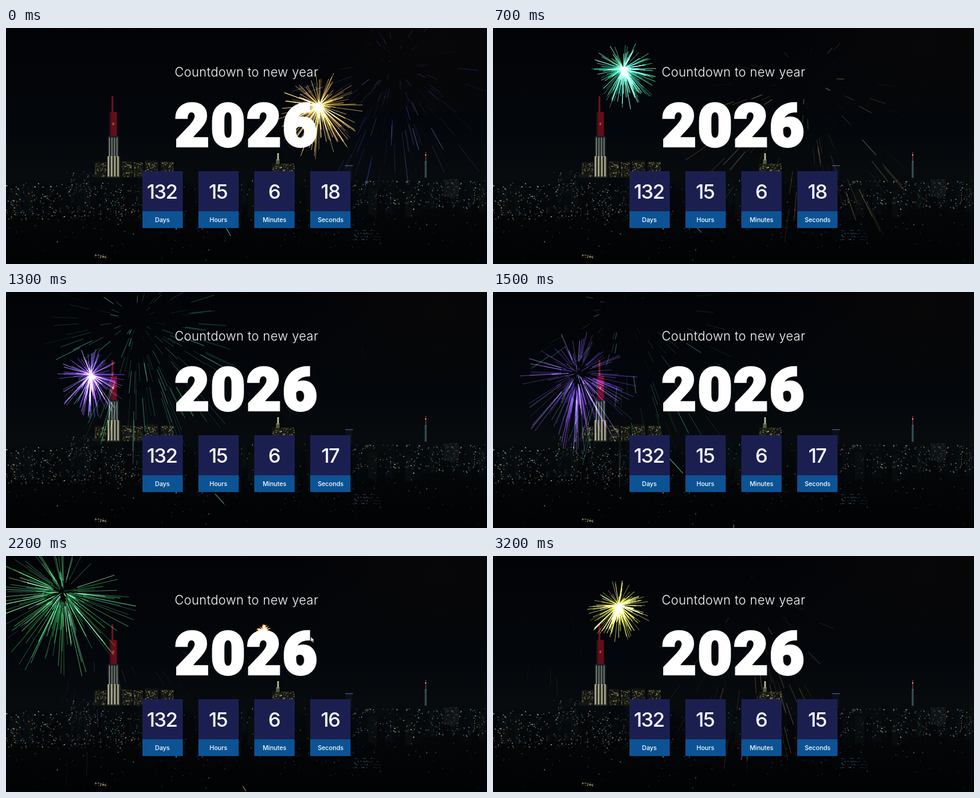
Recreate the animation shown at these times as an HTML page with a canvas. Size 800 by 394 pixels, loop 3.3 s.

```html
<!DOCTYPE html>
<html lang="en">
<head>
<meta charset="utf-8">
<title>New year countdown</title>
<style>
  html, body { margin: 0; width: 100%; height: 100%; overflow: hidden; background: #000; }
  canvas, svg { position: absolute; left: 0; top: 0; }
  rect { shape-rendering: crispEdges; }
  text { fill: #fff; text-anchor: middle; font-family: Inter, sans-serif; }
  .title { font-size: 20.8px; font-weight: 300; letter-spacing: .4px; }
  .year { font: 900 98px Roboto, sans-serif; letter-spacing: 3px; stroke: #fff; stroke-width: 4.5; }
  .count { font-size: 33px; font-weight: 500; letter-spacing: -1.5px; }
  .label { font-size: 10.3px; font-weight: 500; }
</style>
</head>
<body>
<canvas id="stage" width="800" height="394"></canvas>
<svg id="overlay" width="800" height="394">
  <text class="title" x="400" y="81">Countdown to new year</text>
  <text class="year" x="400.5" y="196.5">2026</text>
  <path id="cursor" d="M507 135v8l2-1.6 1.6 3 1.3-.7-1.5-2.8h2.3z" fill="#fff" stroke="#444" stroke-width=".7"/>
</svg>
<script>
const W = 800, H = 394, LOOP = 3300, STEP = 100;
const FRICTION = 0.97, GRAVITY = 1.5, TRAIL = 15;
const ctx = stage.getContext('2d');

function seeded(seed) {
  return (lo = 0, hi = 1) => {
    seed = (seed + 0x6D2B79F5) | 0;
    let n = Math.imul(seed ^ seed >>> 15, 1 | seed);
    n = n + Math.imul(n ^ n >>> 7, 61 | n) ^ n;
    return lo + (hi - lo) * (((n ^ n >>> 14) >>> 0) / 4294967296);
  };
}

// Countdown boxes
[['Days', 132], ['Hours', 15], ['Minutes', 6], ['Seconds', 18]].forEach(([label, value], i) => {
  const x = 226.5 + i * 93.3, mid = x + 33.5;
  overlay.insertAdjacentHTML('beforeend', `
    <rect x="${x}" y="239" width="67" height="67" fill="#1b1f50"/>
    <rect x="${x}" y="306" width="67" height="28" fill="#0b5394"/>
    <text class="count" x="${mid - .7}" y="284.5">${value}</text>
    <text class="label" x="${mid}" y="323.7">${label}</text>`);
});
const seconds = overlay.querySelectorAll('.count')[3];

// Night skyline, painted once
function paintCity() {
  const city = document.createElement('canvas');
  city.width = W;
  city.height = H;
  const c = city.getContext('2d'), rnd = seeded(26);
  const box = (x, y, w, h, color, alpha = 1) => {
    c.globalAlpha = alpha;
    c.fillStyle = color;
    c.fillRect(x, y, w, h);
  };
  const pick = list => list[Math.floor(rnd(0, list.length))];
  const lights = (count, x0, x1, y0, y1, colors, alpha) => {
    for (let i = 0; i < count; i++)
      box(rnd(x0, x1), rnd(y0, y1), rnd(.8, 2.1), rnd(.8, 2.1), pick(colors), alpha * rnd(.2, 1) ** 2);
  };

  const sky = c.createLinearGradient(0, 0, 0, H);
  [[0, '#020307'], [.4, '#03060a'], [.64, '#070b0e'], [.8, '#030507'], [1, '#010203']]
    .forEach(([at, color]) => sky.addColorStop(at, color));
  box(0, 0, W, H, sky);
  const haze = c.createRadialGradient(720, 15, 0, 720, 15, 240);
  haze.addColorStop(0, '#120d0955');
  haze.addColorStop(1, '#120d0900');
  box(0, 0, W, 140, haze);

  for (let x = 0; x < W; x += rnd(9, 20))
    box(x, rnd(247, 272), rnd(8, 24), 45, pick(['#05090c', '#070c0f', '#04070a', '#090e10']), .8);
  const mixed = ['#e0bd83', '#8fcfc8', '#c4d2ca', '#5b9aa0', '#d09050'];
  const warm = ['#cbbd8d', '#9c9972', '#ddc994'];
  lights(420, 0, 225, 258, 320, mixed, .95);
  lights(150, 225, 580, 245, 322, mixed, .85);
  lights(330, 575, W, 254, 302, mixed, .85);
  lights(170, 0, W, 305, 345, mixed, .5);
  lights(60, 0, W, 345, 388, mixed, .4);
  lights(24, 0, W, 288, 370, ['#f0a050', '#9fe0dc', '#5a55c8'], 1);

  [[147, 224, 20], [192, 222, 18], [212, 224, 16], [231, 221, 22], [257, 223, 22], [442, 226, 38]]
    .forEach(([x, y, w]) => {
      box(x, y, w, 250 - y, '#11140f');
      lights(w * 4, x, x + w - 1, y, 248, warm, .75);
    });
  lights(70, 100, 146, 236, 270, mixed, .5);

  // Tall tower
  box(175.5, 114, 3, 28, '#6b1622');
  box(172.5, 140, 12, 41, '#640d1a');
  box(172.5, 140, 2.5, 41, '#35101a');
  box(177, 158, 3, 4, '#b4813c', .6);
  box(169.5, 180, 18, 35, '#1c2224');
  box(168, 215, 22, 35, '#24271f');
  for (let i = 0; i < 4; i++) {
    box(171 + i * 4.2, 183, 2, 32, '#9aa59b', .65);
    box(169 + i * 5.3, 214, 2.8, 34, '#cfccac', .75);
  }

  // Smaller landmarks
  box(451, 209, 3, 12, '#c7c995', .85);
  box(449, 219, 6, 8, '#7f8d62', .6);
  box(564, 229, 13, 1.5, '#575ca0', .8);
  box(565, 231, 11, 24, '#0b1118');
  box(697.5, 207, 1.5, 18, '#913e43', .8);
  box(696.5, 222, 3, 28, '#477c80', .65);
  box(697, 211, 2, 2, '#f39b90');
  box(728, 252, 25, 30, '#0d1317');
  lights(50, 728, 752, 252, 280, mixed, .6);
  for (let y = 337; y < 356; y += 5)
    lights(24, 576, 622, y, y + 1, ['#52778d', '#3d5d78'], .7);
  lights(34, 147, 166, 377, 383, warm, .9);
  return city;
}

// Each shell: launch and burst ticks, burst point, spread, hue
const shells = [
  [-89, -40, 645, 88, 7.5, 240],
  [-53, -10.5, 521, 129, 8.3, 40],
  [-21.5, 26.4, 217, 68, 8.3, 156],
  [17.5, 51.3, 141, 138, 6.7, 258],
  [41.5, 90, 95, 62, 8.3, 138],
  [70, 107, 428, 124, 6.4, 30],
  [104.5, 149.5, 209, 82, 8.7, 60],
  [131, 180, 470, 100, 7, 250]
].map(([launch, burst, x, y, spread, hue], i) => {
  const rnd = seeded(i + 91);
  const sparks = Array.from({ length: 165 }, () => ({
    angle: rnd(0, 2 * Math.PI),
    speed: rnd(1, spread),
    decay: rnd(.013, .03),
    width: rnd(.6, 1.3),
    color: `hsl(${hue + rnd(-12, 12)} 65% ${rnd(45, 75)}%)`
  }));
  return { launch, burst, x, y, hue, sparks };
});

// Animation ticks pass at an uneven rate through the loop
const ticks = t => t < 400 ? t * .057
  : t < 1000 ? 22.8 + (t - 400) * .038
  : t < 2200 ? 45.6 + (t - 1000) * .053
  : 109.2 + (t - 2200) * .047;

function streak(from, to, color, alpha, width) {
  ctx.globalAlpha = alpha;
  ctx.strokeStyle = color;
  ctx.lineWidth = width;
  ctx.beginPath();
  ctx.moveTo(...from);
  ctx.lineTo(...to);
  ctx.stroke();
}

function drawRocket(s, age) {
  const at = n => {
    const p = (1.05 ** Math.max(0, n) - 1) / (1.05 ** (s.burst - s.launch) - 1);
    return [W / 2 + (s.x - W / 2) * p, H + (s.y - H) * p];
  };
  streak(at(age - 4), at(age), `hsl(${s.hue} 60% 65%)`, .7, 1.1);
}

function drawBurst(s, age) {
  for (const { angle, speed, decay, width, color } of s.sparks) {
    const alpha = 1 - age * decay;
    if (alpha <= 0) continue;
    const at = n => {
      const r = speed * (1 - FRICTION ** n) / (1 - FRICTION);
      return [s.x + Math.cos(angle) * r, s.y + Math.sin(angle) * r + GRAVITY * n];
    };
    streak(at(Math.max(0, age - TRAIL)), at(age), color, alpha, width);
  }
}

const city = paintCity();

function draw(now) {
  const t = Math.floor(now % LOOP / STEP) * STEP, tick = ticks(t);
  ctx.globalAlpha = 1;
  ctx.globalCompositeOperation = 'source-over';
  ctx.drawImage(city, 0, 0);
  ctx.globalCompositeOperation = 'lighter';
  for (const s of shells) {
    if (tick > s.burst) drawBurst(s, tick - s.burst);
    else if (tick > s.launch) drawRocket(s, tick - s.launch);
  }
  seconds.textContent = 18 - Math.floor((t + 100) / 1000);
  cursor.style.display = t >= 2100 && t <= 2300 ? '' : 'none';
  requestAnimationFrame(draw);
}
requestAnimationFrame(draw);
</script>
</body>
</html>
```
